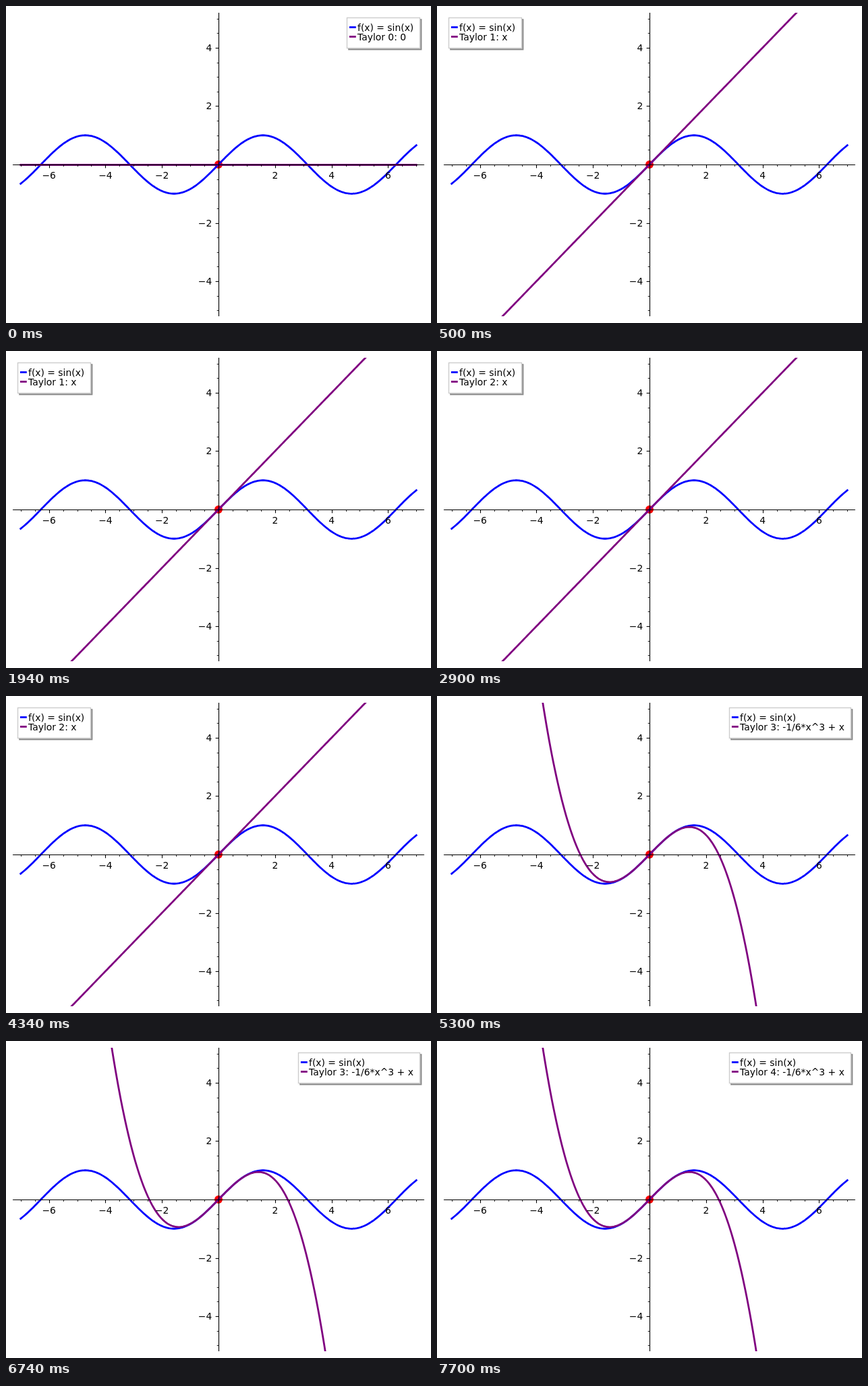
Write an HTML page with a canvas that moves like this. It is 630 by 470 pixels and loops after 8000 ms.

```html
<!DOCTYPE html>
<html lang="en">
<head>
<meta charset="utf-8">
<title>Taylor polynomials of sin(x)</title>
<style>
  html, body { margin: 0; width: 100%; height: 100%; overflow: hidden; background: #fff; }
  canvas { display: block; }
</style>
</head>
<body>
<canvas id="stage" width="630" height="470"></canvas>
<script>
const ctx = document.getElementById("stage").getContext("2d");
const LOOP = 8000, STEP = 2400, FIRST = 500;
const PT = 100 / 72;
const BOX = { left: 10, top: 10, width: 610, height: 450 };
const ORIGIN = { x: 315, y: 235 };
const UNIT = { x: BOX.width / 14.56, y: BOX.height / 10.4 };
const BLUE = "#0000ff", PURPLE = "#800080";

const line = { label: "x", fn: x => x, left: 17, right: 125 };
const cubic = { label: "-1/6*x^3 + x", fn: x => x - x ** 3 / 6, left: 433, right: 613 };
const flat = { label: "0", fn: () => 0, left: 505, right: 613 };
const polynomials = [flat, line, line, cubic, cubic];

const toX = x => ORIGIN.x + x * UNIT.x;
const toY = y => ORIGIN.y - y * UNIT.y;
const snap = v => Math.round(v) + 0.5;

function segment(x1, y1, x2, y2) {
  ctx.beginPath();
  ctx.moveTo(x1, y1);
  ctx.lineTo(x2, y2);
  ctx.stroke();
}

function curve(fn, color, shift = 0) {
  ctx.save();
  ctx.beginPath();
  ctx.rect(BOX.left, BOX.top, BOX.width, BOX.height);
  ctx.clip();
  ctx.strokeStyle = color;
  ctx.lineWidth = 2 * PT;
  ctx.lineCap = "square";
  ctx.lineJoin = "round";
  ctx.beginPath();
  for (let i = 0; i <= 280; i++) {
    const x = -7 + i / 20;
    ctx.lineTo(toX(x), toY(fn(x)) + shift);
  }
  ctx.stroke();
  ctx.restore();
}

function text(str, x, y, align) {
  ctx.fillStyle = "#000";
  ctx.textAlign = align;
  ctx.fillText(str, x, y);
}

function axes() {
  const ax = snap(ORIGIN.x), ay = snap(ORIGIN.y);
  ctx.strokeStyle = "#000";
  ctx.lineWidth = 0.8 * PT;
  segment(BOX.left, ay, BOX.left + BOX.width, ay);
  segment(ax, BOX.top, ax, BOX.top + BOX.height);

  for (let v = -7; v <= 7; v += 0.5) {
    if (v === 0) continue;
    const major = v % 2 === 0;
    const length = (major ? 3.5 : 2) * PT;
    const name = String(v).replace("-", "\u2212");
    const x = snap(toX(v)), y = snap(toY(v));
    ctx.lineWidth = (major ? 0.8 : 0.6) * PT;
    segment(x, ay, x, ay + length);
    if (major) text(name, toX(v), 256, "center");
    if (Math.abs(v) <= 5) {
      segment(ax, y, ax - length, y);
      if (major) text(name, 305.3, Math.round(toY(v)) + 5, "right");
    }
  }
}

function legend({ left, right, label }, order) {
  const top = 17, width = right - left, height = 45, offset = 2 * PT;
  ctx.lineWidth = PT;
  ctx.fillStyle = ctx.strokeStyle = "rgba(76,76,76,0.5)";
  ctx.fillRect(left + offset, top + offset, width, height);
  ctx.strokeRect(left + offset, top + offset, width, height);
  ctx.fillStyle = "#fff";
  ctx.strokeStyle = "#ccc";
  ctx.fillRect(left + 0.5, top + 0.5, width, height);
  ctx.strokeRect(left + 0.5, top + 0.5, width, height);

  const entry = (str, color, baseline) => {
    ctx.strokeStyle = color;
    ctx.lineWidth = 2 * PT;
    ctx.lineCap = "square";
    segment(left + 5.3, baseline - 5.5, left + 12.4, baseline - 5.5);
    ctx.lineCap = "butt";
    text(str, left + 16, baseline, "left");
  };
  entry("f(x) = sin(x)", BLUE, 37);
  entry(`Taylor ${order}: ${label}`, PURPLE, 51);
}

function draw(time) {
  const order = Math.floor((time + STEP - FIRST) / STEP);
  const poly = polynomials[order];
  ctx.fillStyle = "#fff";
  ctx.fillRect(0, 0, 630, 470);
  ctx.font = `${10 * PT}px "DejaVu Sans", sans-serif`;
  ctx.lineCap = "butt";

  ctx.fillStyle = "#f00";
  ctx.beginPath();
  ctx.arc(ORIGIN.x, ORIGIN.y, 6, 0, 2 * Math.PI);
  ctx.fill();

  curve(Math.sin, BLUE);
  curve(poly.fn, PURPLE, order === 0 ? 0.5 : 0);
  axes();
  legend(poly, order);
}

const start = performance.now();
function tick() {
  draw((performance.now() - start) % LOOP);
  requestAnimationFrame(tick);
}
tick();
</script>
</body>
</html>
```
